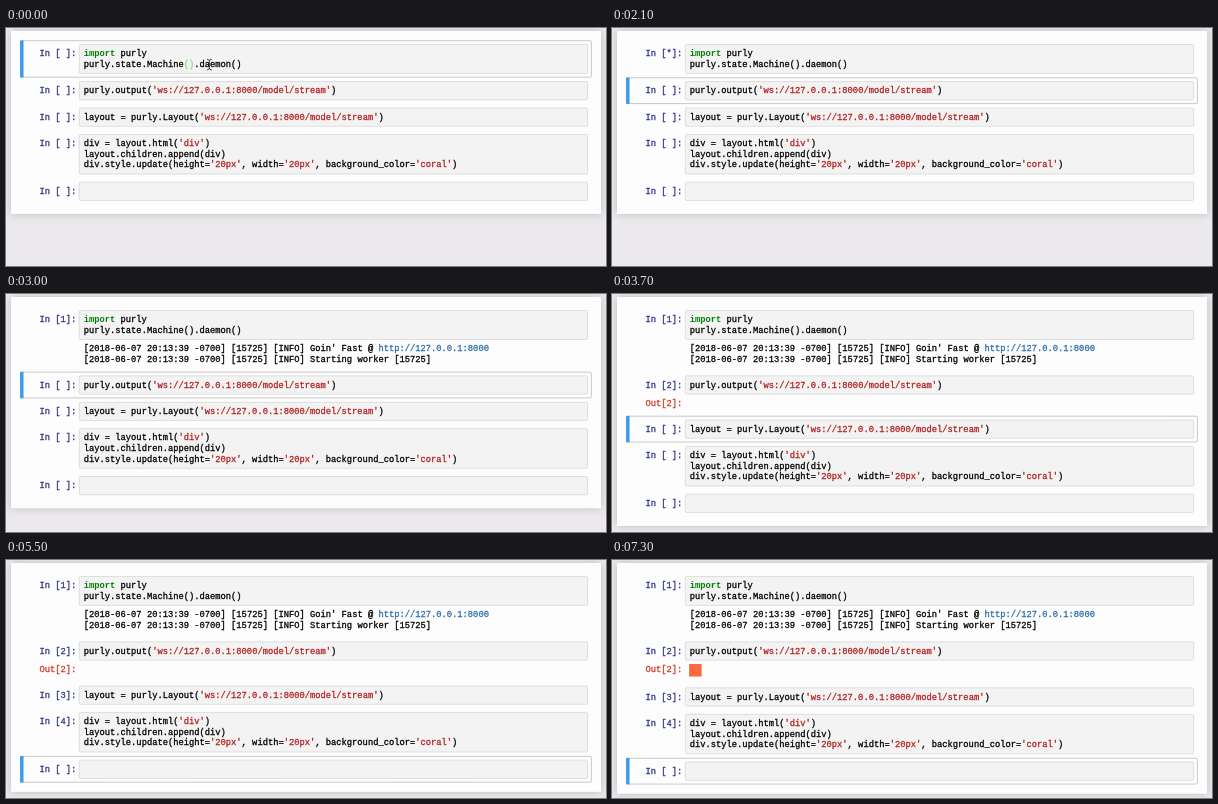
An HTML page with a canvas that plays this animation: 600 by 238 pixels, repeating every 7.5 s.

```html
<!DOCTYPE html>
<html lang="en">
<head>
<meta charset="utf-8">
<title>Notebook run</title>
<style>
  html, body { margin: 0; width: 100%; height: 100%; overflow: hidden; background: #ebe9eb; }
  canvas { display: block; width: 600px; height: 238px; }
</style>
</head>
<body>
<canvas id="stage"></canvas>
<script>
const W = 600, H = 238, LOOP = 7500;
const SCALE = 0.6264;             // notebook units to stage pixels
const LINE = 17, CHAR = 8.4, BASE = 12.6;
const PAGE = { x: 8, y: 4.8, w: 942, pad: 15 };
const CELL = { x: 22.5, w: 912.5, pad: 6 };
const INPUT = { x: 116.5, w: 812.5, pad: 6.6 };
const TEXT_X = INPUT.x + 7.6;
const OUT_PAD = 5.6;
const FONT = '14px "Liberation Mono", "Courier New", monospace';
const INK = 0.45;                 // outline that thickens the glyphs

// Moments of the session in ms
const CLICK = 100, CARET_OFF = 700, RUN1 = 1000, LOG = 2300, RUN2 = 3200,
      RUN3 = 4400, RUN4 = 5400, SQUARE = 5700;

const COLOR = {
  back: '#ebe9eb', page: '#fefdfe', input: '#f4f3f4', border: '#cfcfcf',
  frame: '#ababab', command: '#3c9ce9', edit: '#66bb6a', text: '#000',
  keyword: '#008000', string: '#b02020', bracket: '#7fdf7f',
  prompt: '#2c3684', out: '#cf3a24', link: '#296eaa', coral: '#fb6a3f'
};

const CODE = [
  ['import purly', 'purly.state.Machine().daemon()'],
  ["purly.output('ws://127.0.0.1:8000/model/stream')"],
  ["layout = purly.Layout('ws://127.0.0.1:8000/model/stream')"],
  ["div = layout.html('div')", 'layout.children.append(div)',
   "div.style.update(height='20px', width='20px', background_color='coral')"],
  ['']
];
const STAMP = '[2018-06-07 20:13:39 -0700] [15725] [INFO] ';

const canvas = document.getElementById('stage');
const ctx = canvas.getContext('2d');
const dpr = window.devicePixelRatio || 1;
canvas.width = W * dpr;
canvas.height = H * dpr;

function write(str, x, y, color, bold) {
  ctx.font = (bold ? 'bold ' : '') + FONT;
  ctx.fillStyle = ctx.strokeStyle = color;
  ctx.fillText(str, x, y + BASE);
  if (bold) return;
  ctx.lineWidth = INK;
  ctx.strokeText(str, x, y + BASE);
}

function writeCode(str, y) {
  let x = TEXT_X;
  for (const part of str.split(/('[^']*'|\bimport\b)/)) {
    const keyword = part === 'import';
    const color = keyword ? COLOR.keyword : part[0] === "'" ? COLOR.string : COLOR.text;
    write(part, x, y, color, keyword);
    x += part.length * CHAR;
  }
}

function writePrompt(str, y, color) {
  write(str, INPUT.x - 4.2 - str.length * CHAR, y, color);
}

function box(x, y, w, h, fill, stroke) {
  ctx.beginPath();
  ctx.roundRect(x + 0.5, y + 0.5, w - 1, h - 1, 2);
  if (fill) { ctx.fillStyle = fill; ctx.fill(); }
  ctx.strokeStyle = stroke;
  ctx.lineWidth = 1;
  ctx.stroke();
}

function select(y, h, editing) {
  box(CELL.x, y, CELL.w, h, null, editing ? COLOR.edit : COLOR.frame);
  ctx.fillStyle = editing ? COLOR.edit : COLOR.command;
  ctx.fillRect(CELL.x, y, 5.5, h);
}

function drawLog(y) {
  const start = STAMP + "Goin' Fast @ ";
  write(start, TEXT_X, y, COLOR.text);
  write('http://127.0.0.1:8000', TEXT_X + start.length * CHAR, y, COLOR.link);
  write(STAMP + 'Starting worker [15725]', TEXT_X, y + LINE, COLOR.text);
}

function drawResult(y, t) {
  writePrompt('Out[2]:', y, COLOR.out);
  if (t >= SQUARE) {
    ctx.fillStyle = COLOR.coral;
    ctx.fillRect(INPUT.x + INPUT.pad, y, 20, 20);
  }
}

function drawPointer(x, y) {
  ctx.beginPath();
  ctx.moveTo(x - 4, y - 8);
  ctx.quadraticCurveTo(x, y - 8, x, y - 5);
  ctx.quadraticCurveTo(x, y - 8, x + 4, y - 8);
  ctx.moveTo(x, y - 5);
  ctx.lineTo(x, y + 6);
  ctx.moveTo(x - 4, y + 9);
  ctx.quadraticCurveTo(x, y + 9, x, y + 6);
  ctx.quadraticCurveTo(x, y + 9, x + 4, y + 9);
  ctx.strokeStyle = '#333';
  ctx.lineWidth = 1.4;
  ctx.stroke();
}

function mark(i, t) {
  if (i === 0) return t >= LOG ? '1' : t >= RUN1 ? '*' : ' ';
  return t >= [0, RUN2, RUN3, RUN4, LOOP][i] ? String(i + 1) : ' ';
}

function outputHeight(i, t) {
  if (i === 0 && t >= LOG) return 2 * LINE + 2 * OUT_PAD;
  if (i === 1 && t >= RUN2) return (t >= SQUARE ? 20 : LINE) + 2 * OUT_PAD;
  return 0;
}

function layout(t) {
  let y = PAGE.y + PAGE.pad;
  return CODE.map((lines, i) => {
    const input = lines.length * LINE + 2 * INPUT.pad;
    const out = outputHeight(i, t);
    const cell = { lines, y, input, out, h: input + out + 2 * CELL.pad };
    y += cell.h;
    return cell;
  });
}

function drawPage(bottom) {
  ctx.save();
  ctx.shadowColor = 'rgba(87, 87, 87, 0.3)';
  ctx.shadowBlur = 8 * dpr;
  ctx.fillStyle = COLOR.page;
  ctx.fillRect(PAGE.x, PAGE.y, PAGE.w, bottom - PAGE.y);
  ctx.restore();
}

function drawCell(cell, i, t) {
  const top = cell.y + CELL.pad;
  const textY = top + INPUT.pad;
  box(INPUT.x, top, INPUT.w, cell.input, COLOR.input, COLOR.border);
  writePrompt(`In [${mark(i, t)}]:`, textY, COLOR.prompt);
  cell.lines.forEach((str, n) => writeCode(str, textY + n * LINE));
  if (cell.out) (i === 0 ? drawLog : drawResult)(top + cell.input + OUT_PAD, t);
}

// Bracket highlight, caret and mouse pointer in the first cell
function drawEditing(cell, t) {
  const y = cell.y + CELL.pad + INPUT.pad + LINE;
  const caretX = TEXT_X + 24 * CHAR;
  if (t < CLICK) {
    const x = TEXT_X + 19 * CHAR;
    ctx.fillStyle = COLOR.input;
    ctx.fillRect(x, y + 1, 2 * CHAR, LINE - 1);
    write('()', x, y, COLOR.bracket);
  } else if (t < CARET_OFF) {
    ctx.fillStyle = '#000';
    ctx.fillRect(caretX, y, 1.4, LINE);
  }
  drawPointer(caretX - 1, y + 8.5);
}

function draw(t) {
  ctx.setTransform(dpr, 0, 0, dpr, 0, 0);
  ctx.fillStyle = COLOR.back;
  ctx.fillRect(0, 0, W, H);
  ctx.scale(SCALE, SCALE);
  ctx.lineJoin = 'round';

  const cells = layout(t);
  const last = cells[cells.length - 1];
  drawPage(last.y + last.h + PAGE.pad);

  const active = [RUN1, RUN2, RUN3, RUN4].filter(run => t >= run).length;
  const editing = t >= CLICK && t < RUN1;
  select(cells[active].y, cells[active].h, editing);
  cells.forEach((cell, i) => drawCell(cell, i, t));
  if (t < RUN1) drawEditing(cells[0], t);
}

const begin = performance.now();
function tick() {
  draw((performance.now() - begin) % LOOP);
  requestAnimationFrame(tick);
}
tick();
</script>
</body>
</html>
```
